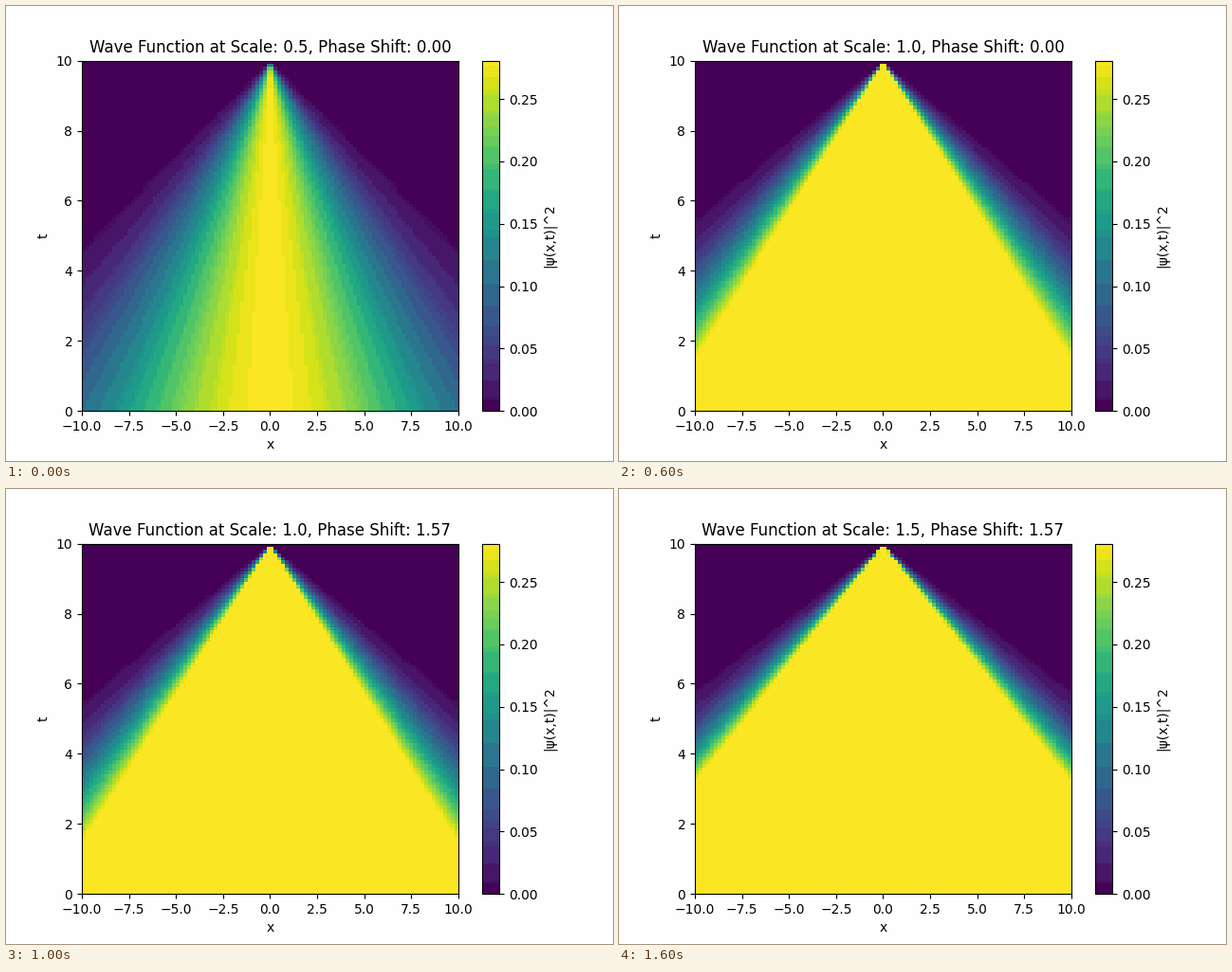
Recreate the animation shown at these times as a matplotlib script. Size 640 by 480 pixels, loop 1.8 s.

```python
import numpy as np
import matplotlib.pyplot as plt
from matplotlib.animation import FuncAnimation
from matplotlib.colors import ListedColormap

plt.rcParams["font.family"] = "DejaVu Sans"

SCALES = (0.5, 1.0, 1.5)
PHASES = (0, np.pi / 4, np.pi / 2)
PEAK = 0.2808
PAPER = "#fefefe"

x, t = np.meshgrid(np.linspace(-10, 10, 100), np.linspace(0, 10, 100))


def density(scale):
    """Squared modulus of the wave; the phase factor drops out."""
    spread = np.maximum(t, 1e-6)
    return PEAK * (scale / SCALES[0]) ** 2 * np.exp(-(x / spread) ** 2)


def banded_viridis(values):
    """Viridis with close shades merged into bands, weighted by their use."""
    shades = np.round(plt.get_cmap("viridis")(np.arange(256))[:, :3] * 255).astype(int)
    level = np.clip(values / PEAK * 256, 0, 255).astype(int)
    weight = np.bincount(level.ravel(), minlength=256) + 2
    cells = shades // (32, 16, 32)
    keys = cells @ (256, 16, 1)
    bands = shades.copy()
    for key in np.unique(keys):
        same = keys == key
        bands[same] = np.average(shades[same], axis=0, weights=weight[same])
    return ListedColormap(bands / 255)


fields = [density(s) for s in SCALES]

fig, ax = plt.subplots(figsize=(6.4, 4.8), dpi=100, facecolor=PAPER)
image = ax.imshow(fields[0], extent=(-10, 10, 0, 10), aspect="auto",
                  cmap=banded_viridis(fields[0]), vmin=0, vmax=PEAK,
                  interpolation="nearest")
fig.colorbar(image, ax=ax, label="|ψ(x,t)|^2")
ax.set_xlabel("x")
ax.set_ylabel("t")
title = ax.set_title("")


def update(frame):
    s, p = divmod(frame, len(PHASES))
    image.set_data(fields[s])
    title.set_text(f"Wave Function at Scale: {SCALES[s]:.1f}, "
                   f"Phase Shift: {PHASES[p]:.2f}")
    return image, title


anim = FuncAnimation(fig, update, frames=len(SCALES) * len(PHASES),
                     interval=200, repeat=True, repeat_delay=0)
plt.show()
```
